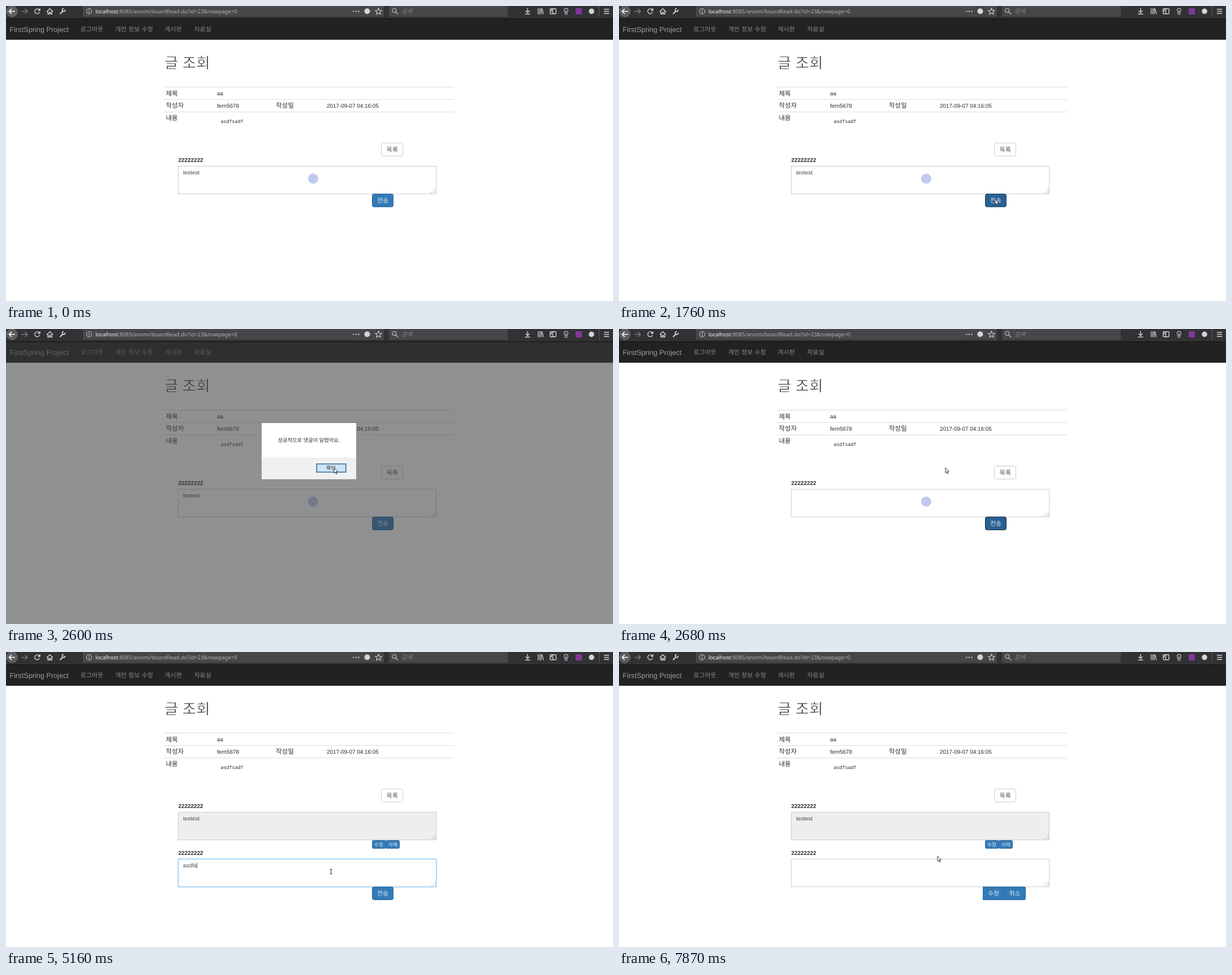
An HTML page that plays this animation: 1073 px wide and 522 px high, repeating every 8 s.

```html
<!DOCTYPE html>
<html lang="ko">
<head>
<meta charset="utf-8">
<title>FirstSpring Project</title>
<style>
html, body { margin: 0; width: 100%; height: 100%; overflow: hidden; background: #fff; }
svg { display: block; width: 100%; height: 100%; }
text { font: 9.9px "Liberation Sans", Arial, sans-serif; fill: #2b2b2b; white-space: pre; text-rendering: geometricPrecision; }
.ko { font-family: "Noto Sans CJK KR", "Noto Sans CJK JP", "Noto Sans CJK SC", sans-serif; font-size: 11px; }
.mid { text-anchor: middle; }
.nav text { fill: #9d9d9d; }
.nav .ko { fill: #8c8c8c; }
.title { font-size: 26.5px; font-weight: 300; stroke: #fff; stroke-width: .7; }
.key { font-size: 11.5px; }
.label { font-weight: bold; }
.input { fill: #4a4a4a; }
.area { fill: #fff; stroke: #ccc; }
.area.focus { stroke: #84c0ee; filter: drop-shadow(0 0 1.6px rgba(102, 175, 233, .5)); }
.btn { fill: #337ab7; stroke: #2e6da4; }
.btn.dark { fill: #286090; stroke: #204d74; }
.btn.pressed { stroke: #122b40; }
.btn + text { fill: #dfeaf3; }
.plain { fill: #fff; stroke: #ccc; }
.plain + text { fill: #555; }
.plain.dark { fill: #e6e6e6; stroke: #adadad; }
.small { font-size: 8.8px; }
.icon { fill: none; stroke: #d4d4d6; stroke-width: 1.4; }
.solid { fill: #d4d4d6; stroke: none; }
.url { font-family: "Noto Sans", sans-serif; font-size: 9.5px; fill: #b1b1b3; }
#ok { fill: #e1e1e1; stroke: #0078d7; stroke-width: 1.5; }
#ok.dark { fill: #e5f1fb; }
#ok.pressed { fill: #cce4f7; stroke: #2d6a9c; }
</style>
</head>
<body>
<svg viewBox="0 0 1073 522">
  <defs>
    <path id="grip" d="M758 325h1M755 328h1M758 328h1M752 331h1M755 331h1M758 331h1" stroke="#999" stroke-width="1.3"/>
  </defs>
  <rect width="1073" height="522" fill="#fff"/>

  <!-- browser toolbar -->
  <rect width="1073" height="23" fill="#323234"/>
  <path d="M0 22.5H1073" stroke="#101011"/>
  <path d="M136 0h532v19h-532zM677 0h210v19h-210z" fill="#474749"/>
  <g class="icon">
    <circle cx="10.5" cy="9.5" r="9.7" fill="#5d5d60" stroke="#737376" stroke-width=".8"/>
    <path d="M16 9.5H5.5M10 5L5.5 9.5L10 14" stroke="#fff" stroke-width="1.6"/>
    <path d="M27.5 9.5H38M33.5 5L38 9.5L33.5 14" stroke="#7d7d80"/>
    <g id="reload">
      <path d="M58.8 6.7A4.4 4.4 0 1 0 59.4 10.6"/>
      <path class="solid" d="M60.6 3.6v5h-5z"/>
    </g>
    <path id="stop" d="M51 5.5l8 8M59 5.5l-8 8"/>
    <path d="M72 10L77.5 4.7L83 10M74 9v5.2h2.5v-3h2v3h2.5V9"/>
    <path d="M95.5 14L100.5 9" stroke-width="2.2"/>
    <path d="M104.6 6.6A2.6 2.6 0 1 1 102 4.4" stroke-width="1.8"/>
    <circle cx="147" cy="9.3" r="4.7" stroke-width="1"/>
    <path d="M147 8.5v3.6M147 6.2v1.3" stroke-width="1.1"/>
    <path d="M613.5 9.5h2.2M618 9.5h2.2M622.5 9.5h2.2" stroke-width="2.2"/>
    <circle class="solid" cx="638.5" cy="9.3" r="5"/>
    <path d="M658.5 3.8l1.6 3.7 4 .4-3 2.7.9 3.9-3.5-2.1-3.5 2.1.9-3.9-3-2.7 4-.4z" stroke-width="1.1"/>
    <path d="M689 10.5L693 14.5" stroke="#b1b1b3" stroke-width="1.7"/>
    <circle cx="686.3" cy="7.8" r="3.4" stroke="#b1b1b3"/>
    <path d="M922 3.5v8M918.5 8.2L922 11.7L925.5 8.2M917.5 14.3h9"/>
    <path d="M940.6 4v10.5M943.6 4v10.5M946.2 4v10.5M947.5 4.5L950 14.3" stroke-width="1.3"/>
    <rect x="961.8" y="4.8" width="10.5" height="9" rx="1.5"/>
    <path d="M966.5 5v9M963 7h2M963 9h2"/>
    <circle cx="990" cy="7.6" r="3.4" stroke="#a9a9ab"/>
    <path d="M988.3 11v3.6h3.4V11M990 7.5v4" stroke="#a9a9ab"/>
    <rect x="1007" y="4" width="11" height="11" fill="#80379b" stroke="none"/>
    <circle class="solid" cx="1035" cy="9.4" r="4.8"/>
    <path d="M1048.5 0V19" stroke="#5a5a5d" stroke-width="1"/>
    <path d="M1057 5.8h9M1057 9.5h9M1057 13.2h9"/>
  </g>
  <text class="url" x="158" y="13"><tspan fill="#f9f9fa">localhost</tspan>:8085/anomi/boardRead.do?id=23&amp;nowpage=0</text>
  <text class="ko" x="699" y="13" style="font-size:10.4px;font-style:italic;fill:#858588">검색</text>

  <!-- page -->
  <rect y="23" width="1073" height="36.4" fill="#222"/>
  <path d="M0 59H1073" stroke="#080808" stroke-width=".8"/>
  <g class="nav">
    <text x="6.5" y="45.5" style="font-size:12.7px">FirstSpring Project</text>
    <text class="ko" x="131.5" y="45">로그아웃</text>
    <text class="ko" x="193" y="45">개인 정보 수정</text>
    <text class="ko" x="280.5" y="45">게시판</text>
    <text class="ko" x="332.5" y="45">자료실</text>
  </g>
  <text class="ko title" x="280" y="110">글 조회</text>
  <path d="M279 143.5H792M279 165.5H792M279 187.5H792" stroke="#ddd"/>
  <text class="ko key" x="282.5" y="158.5">제목</text>
  <text x="373" y="158">aa</text>
  <text class="ko key" x="282.5" y="180">작성자</text>
  <text x="373" y="179.5">fern5678</text>
  <text class="ko key" x="477" y="180">작성일</text>
  <text x="567" y="179.5">2017-09-07 04:16:05</text>
  <text class="ko key" x="282.5" y="202">내용</text>
  <text x="379.5" y="207" style="font:8.3px 'DejaVu Sans Mono',monospace">asdfsadf</text>
  <rect id="list" class="plain" x="663.5" y="242.5" width="38" height="23" rx="3"/>
  <text class="ko mid" x="682.7" y="257.5">목록</text>

  <g id="comment">
    <text class="label" x="304.5" y="275.5">22222222</text>
    <rect class="area" x="304.5" y="283.5" width="456" height="49" style="fill:#eeeeed"/>
    <text class="input" x="313" y="298">testest</text>
    <use href="#grip" y="-1"/>
    <rect class="btn" x="671.5" y="333.5" width="24" height="14" rx="2"/>
    <text class="ko mid small" x="683.8" y="343.5">삭제</text>
    <rect id="edit" class="btn" x="647.5" y="333.5" width="24" height="14" rx="2"/>
    <text class="ko mid small" x="658.8" y="343.5">수정</text>
  </g>

  <g id="form">
    <text class="label" x="304.5" y="275.5">22222222</text>
    <rect id="area" class="area" x="304.5" y="283.5" width="456" height="49"/>
    <text id="input" class="input" x="313" y="298"></text>
    <path id="caret" d="M0 289V300" stroke="#777"/>
    <use href="#grip" y="-1"/>
    <circle id="badge" cx="543" cy="305.5" r="9" fill="#bfcaf0"/>
    <g id="sendGroup">
      <rect id="send" class="btn" x="647.5" y="332.5" width="37" height="23" rx="3"/>
      <text class="ko mid" x="666" y="348">전송</text>
    </g>
    <g id="editGroup">
      <rect class="btn" x="680.5" y="332.5" width="38" height="23" rx="2"/>
      <text class="ko mid" x="699.5" y="348">취소</text>
      <rect class="btn" x="643.5" y="332.5" width="37" height="23"/>
      <text class="ko mid" x="662" y="348">수정</text>
    </g>
  </g>

  <g id="dialog">
    <rect y="23" width="1073" height="499" fill="rgba(56,58,60,.56)"/>
    <rect x="451.5" y="166" width="168" height="100" fill="#fff" stroke="#777" stroke-width=".6"/>
    <rect x="452" y="227.5" width="167" height="38.3" fill="#f0f0f0"/>
    <text class="ko mid" x="535.5" y="200" style="font-size:9.25px">성공적으로 댓글이 달렸어요.</text>
    <rect id="ok" x="549.2" y="238.7" width="51.6" height="14.6"/>
    <text class="ko mid" x="574.5" y="248.5" style="font-size:9px">확인</text>
  </g>

  <path id="arrow" d="M0 0V9.2L2.1 7.3L3.6 10.7L5 10.1L3.6 6.8H6.4Z" fill="#fff" stroke="#222" stroke-width=".9"/>
  <path id="beam" d="M-2 -4H2M-2 4H2M0 -4V4" stroke="#333"/>
</svg>
<script>
const LOOP = 8000, STEP = 78.1;
const $ = id => document.getElementById(id);
const show = (id, on) => $(id).style.display = on ? '' : 'none';
const mark = (id, name, on) => $(id).classList.toggle(name, on);
const clamp = (v, lo, hi) => Math.max(lo, Math.min(hi, v));

// pointer path: time, x, y
const path = [
  [290, 944, 372], [680, 740, 300], [830, 688, 256], [950, 646, 335], [1060, 659, 344],
  [1130, 660, 343], [1280, 665, 342], [2150, 665, 342], [2350, 580, 246], [2600, 580, 246],
  [2630, 577, 245], [3060, 564, 295], [3380, 548, 345], [3700, 531.5, 379], [3800, 531.5, 379],
  [3990, 535, 378], [4080, 535, 378], [4140, 538.5, 373.5], [4240, 538.5, 373.5],
  [4450, 584, 366.5], [4750, 574.5, 388.5], [5160, 574.5, 388.5], [5390, 622, 380], [5600, 663, 368.5],
  [5700, 663, 368.5], [5860, 662, 350], [6350, 664, 339], [7570, 664, 339], [7720, 563, 361]
];

function pointer(t) {
  const i = path.findIndex(p => p[0] > t);
  if (i < 0) return path[path.length - 1].slice(1);
  if (i === 0) return path[0].slice(1);
  const [t0, x0, y0] = path[i - 1], [t1, x1, y1] = path[i];
  const k = (t - t0) / (t1 - t0);
  return [x0 + (x1 - x0) * k, y0 + (y1 - y0) * k];
}

function typedCount(t) {
  if (t < 4930) return 0;
  if (t < 5010) return 2;
  if (t < 5160) return 4;
  if (t < 5780) return 5 + clamp(Math.floor((t - 5160) / 76), 0, 7);
  return 13 + clamp(Math.floor((t - 5780) / 74), 0, 7);
}

function draw(now) {
  const t = now % LOOP;
  const between = (a, b) => t >= a && t < b;

  // the screen is refreshed in even steps, so the pointer hops
  const [x, y] = pointer(290 + Math.floor((t - 278) / STEP) * STEP);
  const over = (l, top, r, b) => t >= 290 && x >= l && x <= r && y >= top && y <= b;

  const modal = between(1840, 2680);
  const reloaded = t >= 3300, posted = t >= 3460, editing = t >= 7350;
  const focus = between(3660, 7260);

  show('dialog', modal);
  mark('ok', 'dark', over(549, 238, 601, 254));
  mark('ok', 'pressed', t >= 2600);

  const loading = between(2760, 3300);
  show('stop', loading);
  show('reload', !loading);
  $('reload').style.opacity = between(3300, 4010) ? .4 : 1;

  show('comment', posted);
  show('badge', !reloaded);
  show('sendGroup', !editing);
  show('editGroup', editing);
  $('form').setAttribute('transform', `translate(0 ${posted ? 83 : 0})`);
  mark('list', 'dark', !modal && over(663, 242, 702, 265));
  mark('send', 'dark', !modal && !reloaded && (t >= 1760 || over(647, 333, 685, 356)));
  mark('send', 'pressed', between(2680, 3300));
  mark('edit', 'dark', over(647, 333, 672, 348) || between(7260, 7870));

  mark('area', 'focus', focus);
  $('input').textContent = t < 2680 ? 'testest' : editing ? '' : 'asdf'.repeat(5).slice(0, typedCount(t));
  show('caret', focus && !between(4160, 4660) && t < 6800);
  const width = $('input').textContent ? $('input').getComputedTextLength() : 0;
  $('caret').setAttribute('transform', `translate(${Math.round(313 + width) + .5} 0)`);

  const onArea = !modal && (over(304, 283, 761, 332) || posted && over(304, 366, 761, 415));
  show('arrow', t >= 290 && !onArea);
  show('beam', onArea);
  for (const id of ['arrow', 'beam']) $(id).setAttribute('transform', `translate(${x} ${y})`);
}

function tick() {
  draw(performance.now());
  requestAnimationFrame(tick);
}
tick();
</script>
</body>
</html>
```
